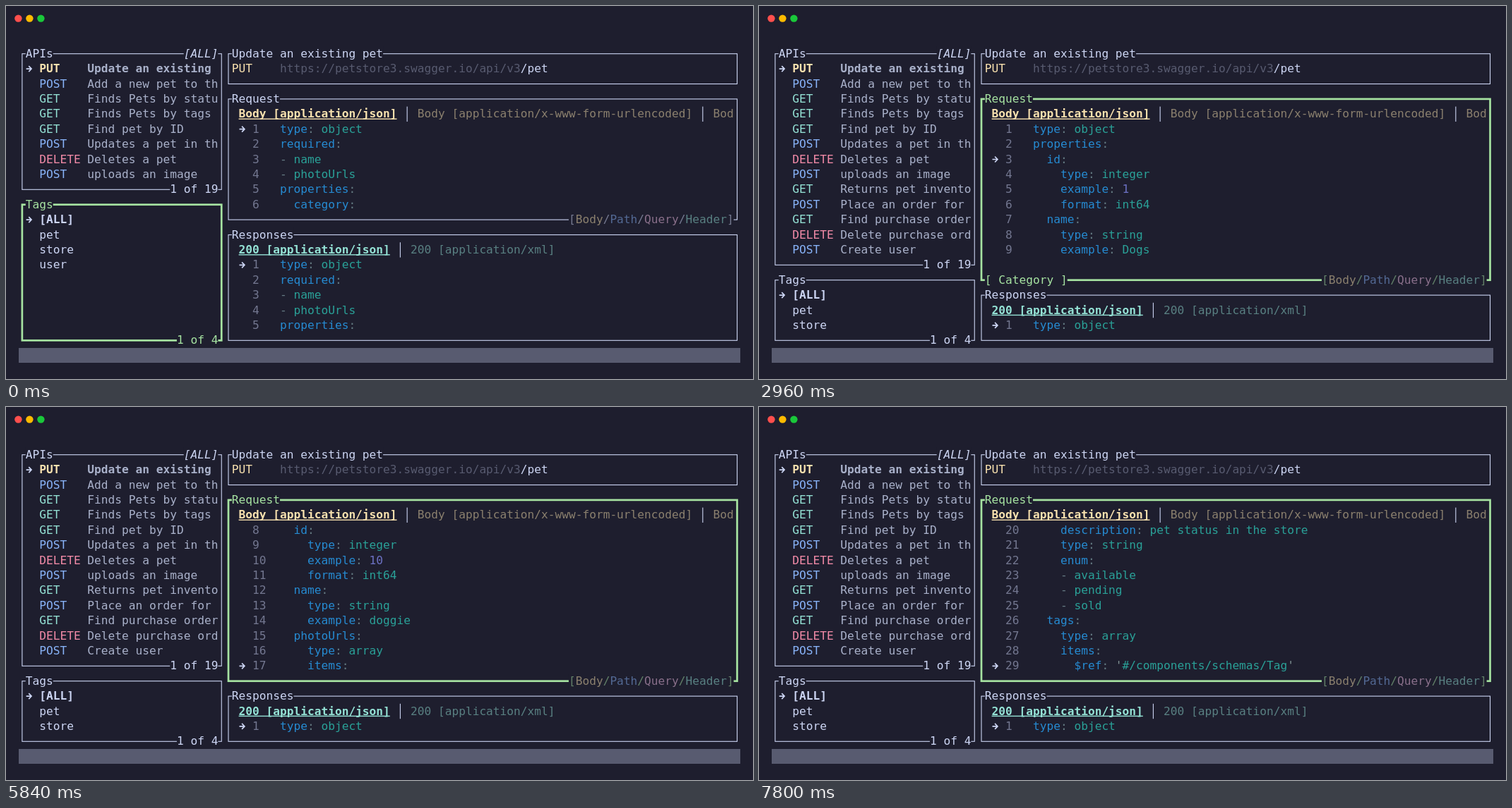
An HTML page with a canvas for the animation above (8000 ms loop, 1058 px wide and 529 px high).

```html
<!DOCTYPE html>
<html lang="en">
<head>
<meta charset="utf-8">
<title>API browser in a terminal</title>
<style>
  html, body { margin: 0; width: 100%; height: 100%; overflow: hidden; background: #1e1e2e; }
  canvas { display: block; }
</style>
</head>
<body>
<canvas id="stage" width="1058" height="529"></canvas>
<script>
const ctx = document.getElementById('stage').getContext('2d');
const LOOP = 8000;

// Terminal grid
const LEFT = 18, TOP = 57, CELL_W = 9.737, CELL_H = 21.4;
const colX = col => LEFT + col * CELL_W;
const rowY = row => TOP + row * CELL_H;
const midX = col => colX(col + 0.5);
const midY = row => rowY(row + 0.5);

const C = {
  bg: '#1e1e2e', fg: '#cdd6f4', item: '#a9b1ca', gray: '#585b70', number: '#737790', focus: '#a6e3a1',
  yellow: '#f9e2af', yellowDim: '#8b806e', cyan: '#94e2d5', cyanDim: '#598082',
  blueDim: '#536994', pinkDim: '#8a708b', fgDim: '#767a91', focusDim: '#628068',
  key: '#268bd2', value: '#2aa198', punct: '#657b83', quote: '#839496', numeral: '#6c71c4'
};
const METHOD = { PUT: C.yellow, POST: '#89b4fa', GET: C.cyan, DELETE: '#f38ba8' };

const apis = [
  ['PUT', 'Update an existing '], ['POST', 'Add a new pet to th'], ['GET', 'Finds Pets by statu'],
  ['GET', 'Finds Pets by tags '], ['GET', 'Find pet by ID'], ['POST', 'Updates a pet in th'],
  ['DELETE', 'Deletes a pet'], ['POST', 'uploads an image'], ['GET', 'Returns pet invento'],
  ['POST', 'Place an order for '], ['GET', 'Find purchase order'], ['DELETE', 'Delete purchase ord'],
  ['POST', 'Create user']
];
const tags = ['[ALL]', 'pet', 'store', 'user'];

const petSchema = `type: object
required:
- name
- photoUrls
properties:
  category:
    $ref: '#/components/schemas/Category'
  id:
    type: integer
    example: 10
    format: int64
  name:
    type: string
    example: doggie
  photoUrls:
    type: array
    items:
      type: string
  status:
    description: pet status in the store
    type: string
    enum:
    - available
    - pending
    - sold
  tags:
    type: array
    items:
      $ref: '#/components/schemas/Tag'`.split('\n');

const categorySchema = `type: object
properties:
  id:
    type: integer
    example: 1
    format: int64
  name:
    type: string
    example: Dogs`.split('\n');

// Key presses
const presses = (start, count) => Array.from({ length: count }, (_, i) => start + i * 160);
const petMoves = [...presses(680, 2), ...presses(1040, 4), ...presses(4400, 17), ...presses(7160, 5)];
const categoryMoves = [2760, 2920, 3120];
const lineAt = (moves, t) => 1 + moves.filter(time => time <= t).length;

// Writes text on the grid and returns the column after it
function write(col, row, text, color, style = '') {
  ctx.font = `${style} 16.17px "DejaVu Sans Mono", monospace`;
  ctx.fillStyle = color;
  const baseline = midY(row) + 5.1;
  [...text].forEach((char, i) => ctx.fillText(char, colX(col + i), baseline));
  return col + text.length;
}

function writeSpans(col, row, spans) {
  for (const [text, color] of spans) col = write(col, row, text, color);
}

function clearCells(col, row, count) {
  ctx.fillStyle = C.bg;
  ctx.fillRect(colX(col), rowY(row), count * CELL_W, CELL_H);
}

function label(col, row, text, color, style) {
  clearCells(col, row, text.length);
  write(col, row, text, color, style);
}

function arrow(col, row) {
  const x = colX(col) + 0.9, y = midY(row);
  ctx.strokeStyle = C.fg;
  ctx.lineWidth = 1.7;
  ctx.beginPath();
  ctx.moveTo(x, y);
  ctx.lineTo(x + 7.4, y);
  ctx.moveTo(x + 3.6, y - 4);
  ctx.lineTo(x + 7.4, y);
  ctx.lineTo(x + 3.6, y + 4);
  ctx.stroke();
}

function panel(left, right, top, bottom, title, focused) {
  const color = focused ? C.focus : C.fg;
  ctx.strokeStyle = color;
  ctx.lineWidth = focused ? 2.7 : 1.1;
  ctx.strokeRect(midX(left), midY(top), midX(right) - midX(left), midY(bottom) - midY(top));
  label(left + 1, top, title, color);
  return color;
}

function tabs(row, names, active, dim) {
  let col = 32;
  names.forEach((name, i) => {
    const start = col;
    col = write(col, row, name, i ? dim : active, i ? '' : 'bold');
    if (!i) ctx.fillRect(colX(start), midY(row) + 6.2, name.length * CELL_W, 1.4);
    if (i < names.length - 1) {
      ctx.fillStyle = C.fg;
      ctx.fillRect(midX(col + 1) - 0.55, rowY(row), 1.1, CELL_H);
    }
    col += 3;
  });
}

function yaml(col, row, line) {
  const [, indent, dash = '', key, rest] = line.match(/^( *)(- )?(?:([\w$]+)(?=:))?(.*)$/);
  const spans = [[indent + dash, C.punct]];
  let value = rest;
  if (key) {
    spans.push([key, C.key], [':', C.punct]);
    value = rest.slice(1);
  }
  if (value.startsWith(" '")) {
    spans.push([" '", C.quote], [value.slice(2, -1), C.value], ["'", C.quote]);
  } else {
    spans.push([value, /^ \d+$/.test(value) ? C.numeral : C.value]);
  }
  writeSpans(col, row, spans);
}

function schema(top, bottom, lines, current) {
  const height = bottom - top;
  const scroll = Math.max(0, current - height);
  lines.slice(scroll, scroll + height).forEach((line, i) => {
    const number = scroll + i + 1;
    if (number === current) arrow(32, top + i);
    write(34, top + i, String(number), C.number);
    yaml(38, top + i, line);
  });
}

function drawLists(split, focused) {
  const apiColor = panel(0, 29, 0, split - 1, 'APIs', false);
  label(24, 0, '[ALL]', apiColor, 'italic');
  label(22, split - 1, '1 of 19', apiColor);
  arrow(1, 1);
  apis.slice(0, split - 2).forEach(([method, name], i) => {
    const style = i ? '' : 'bold';
    write(3, i + 1, method, METHOD[method], style);
    write(10, i + 1, name, C.item, style);
  });

  const tagColor = panel(0, 29, split, 19, 'Tags', focused);
  label(23, 19, '1 of 4', tagColor);
  arrow(1, split + 1);
  tags.slice(0, 18 - split).forEach((tag, i) => write(3, split + 1 + i, tag, C.fg, i ? '' : 'bold'));
}

function drawRequest(bottom, focused, nested, t) {
  const color = panel(30, 104, 3, bottom, 'Request', focused);
  tabs(4, ['Body [application/json]', 'Body [application/x-www-form-urlencoded]', 'Bod'], C.yellow, C.yellowDim);
  if (nested) {
    schema(5, bottom, categorySchema, lineAt(categoryMoves, t));
    label(31, bottom, '[ Category ]', color);
  } else {
    schema(5, bottom, petSchema, lineAt(petMoves, t));
  }
  const dim = focused ? C.focusDim : C.fgDim;
  clearCells(80, bottom, 24);
  writeSpans(80, bottom, [
    ['[', dim], ['Body', C.yellowDim], ['/', dim], ['Path', C.blueDim], ['/', dim],
    ['Query', C.pinkDim], ['/', dim], ['Header', C.cyanDim], [']', dim]
  ]);
}

function draw(t) {
  const focus = t < 200 ? 'tags' : t < 520 ? 'url' : 'request';
  const requestFocused = focus === 'request';
  const requestBottom = requestFocused ? 15 : 11;

  ctx.fillStyle = C.bg;
  ctx.fillRect(0, 0, 1058, 529);
  ['#ff4f4d', '#febb00', '#1ac83a'].forEach((color, i) => {
    ctx.fillStyle = color;
    ctx.beginPath();
    ctx.arc(17.4 + i * 16, 17.6, 5.2, 0, Math.PI * 2);
    ctx.fill();
  });
  ctx.fillStyle = C.gray;
  ctx.fillRect(18, 485, 1022, 21);

  drawLists(focus === 'tags' ? 10 : 15, focus === 'tags');

  panel(30, 104, 0, 2, 'Update an existing pet', focus === 'url');
  write(31, 1, 'PUT', C.yellow);
  writeSpans(38, 1, [['https://petstore3.swagger.io/api/v3', C.gray], ['/pet', C.fg]]);

  drawRequest(requestBottom, requestFocused, t >= 1840 && t < 3440, t);

  panel(30, 104, requestBottom + 1, 19, 'Responses', false);
  tabs(requestBottom + 2, ['200 [application/json]', '200 [application/xml]'], C.cyan, C.cyanDim);
  schema(requestBottom + 3, 19, petSchema, 1);
}

const start = performance.now();
function tick() {
  draw((performance.now() - start) % LOOP);
  requestAnimationFrame(tick);
}
tick();
</script>
</body>
</html>
```
